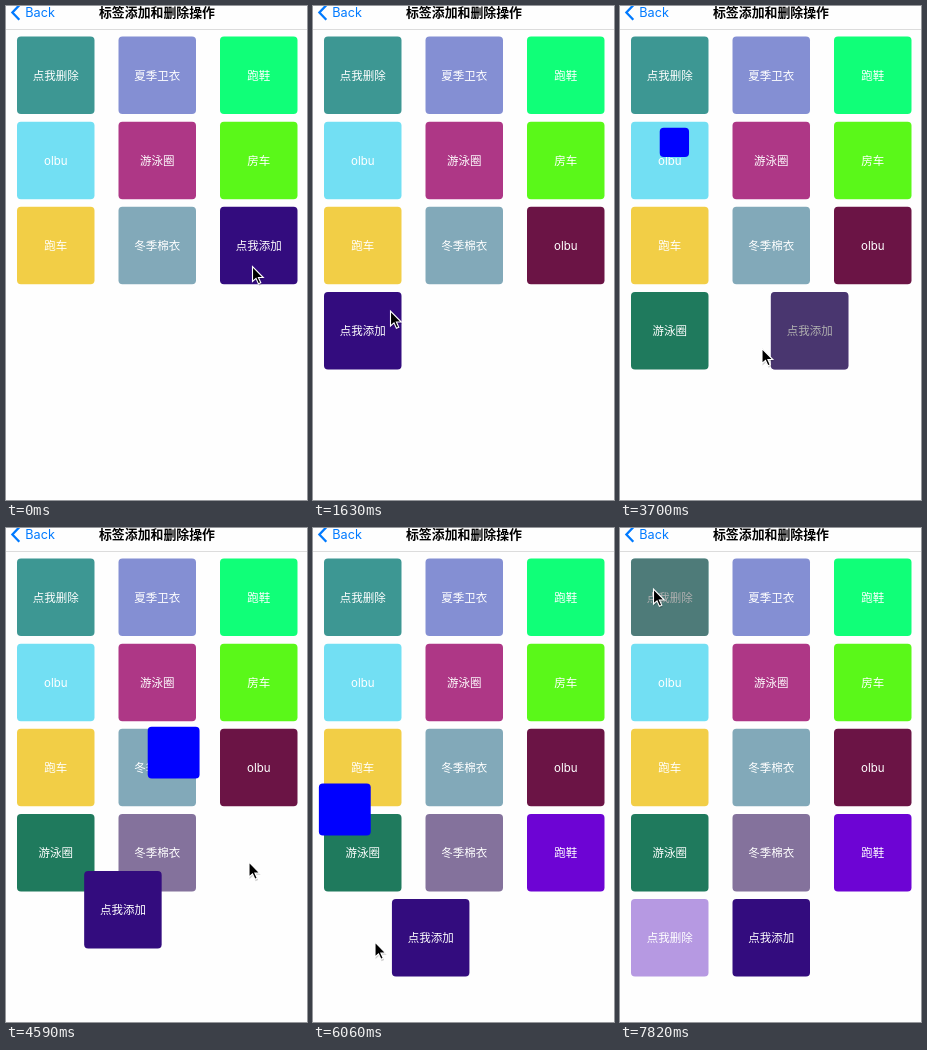
Write an HTML page that moves like this. It is 301 by 494 pixels and loops after 8 s.

```html
<!DOCTYPE html>
<html lang="zh-CN">
<head>
<meta charset="utf-8">
<title>标签添加和删除操作</title>
<style>
html, body { margin: 0; width: 100%; height: 100%; overflow: hidden; background: #fefefe; }
svg { display: block; width: 100vw; height: 100vh; }
text { font-family: Inter, "Noto Sans CJK SC", "Noto Sans CJK", sans-serif; }
.tag text { font-size: 11.5px; fill: #fff; text-anchor: middle; }
</style>
</head>
<body>
<svg id="stage" viewBox="0 0 301 494">
  <rect width="301" height="494" fill="#fefefe"/>
  <rect y="23" width="301" height="1" fill="#dcdcdc"/>
  <path d="M13.3-.8L6.4 6.5l6.9 7.3" fill="none" stroke="#007aff" stroke-width="2.3"/>
  <text x="19.3" y="11" font-size="12.7" fill="#007aff">Back</text>
  <text x="151" y="11.2" font-size="12.9" font-weight="600" text-anchor="middle">标签添加和删除操作</text>
  <g id="tags"></g>
  <rect id="flyer" rx="4" fill="#00f"/>
  <g id="cursor">
    <path d="M.5 1.5v15.5l3.6-3.2 2.5 5.4 2.6-1.2-2.5-5.2h5z" fill="#000" opacity=".18"/>
    <path d="M0 0v15l3.5-3.2 2.4 5.5 2.4-1-2.4-5.3h4.9z" fill="#000" stroke="#fff" stroke-width="1.1"/>
  </g>
</svg>
<script>
const LOOP = 8000, STEP = 147.7, MOVE = 250, SIZE = 77.5;
const FIRST = 8; // slot of the add button before any insertion
const $ = id => document.getElementById(id);

const fixed = [
  ['点我删除', '#3d9793'], ['夏季卫衣', '#848fd3'], ['跑鞋', '#10ff78'],
  ['olbu', '#72dff3'], ['游泳圈', '#ae3786'], ['房车', '#5af819'],
  ['跑车', '#f2ce46'], ['冬季棉衣', '#82a9b9']
];
const inserts = [
  { press: 140, start: 584, label: 'olbu', color: '#6b1445' },
  { press: 2060, start: 2314, label: '游泳圈', color: '#1f7a5d' },
  { press: 3390, start: 3588, label: '冬季棉衣', color: '#84729c' },
  { press: 4275, start: 4425, label: '跑鞋', color: '#6d04d4' },
  { press: 5755, start: 5902, label: '点我删除', color: '#b699e2' }
];
const deletePress = 7670;

// pointer stops: step, x, y
const route = [
  [0, 246.5, 260.5], [5, 246.5, 260.5], [11, 77.5, 305], [13, 64.5, 316],
  [17, 64.5, 316], [20, 142, 356], [22, 142, 356], [24, 142, 342.5],
  [25, 142, 342.5], [28, 243, 334], [31, 243, 334], [35, 175.5, 391.5],
  [37, 62, 414], [41, 62, 414], [45, 56.5, 45.5], [46, 34, 33],
  [47, 24, 20], [49, 30, 50], [50, 33.5, 61], [55, 33.5, 61]
];

const mix = (a, b, p) => a + (b - a) * p;
const ease = t => t * t * (3 - 2 * t);
const progress = (t, start) => ease(Math.min(1, Math.max(0, (t - start) / MOVE)));
const slot = i => [11 + i % 3 * 101.5, 30.5 + Math.floor(i / 3) * 85.15];

function node(name, attrs, parent) {
  const el = document.createElementNS('http://www.w3.org/2000/svg', name);
  for (const key in attrs) el.setAttribute(key, attrs[key]);
  return parent.appendChild(el);
}

function place(el, x, y) {
  el.setAttribute('transform', `translate(${x} ${y})`);
}

function makeTag(label, color, i) {
  const g = node('g', { class: 'tag' }, $('tags'));
  const box = { width: SIZE, height: SIZE, rx: 4 };
  node('rect', { ...box, fill: color }, g);
  node('text', { x: SIZE / 2, y: 43.3 }, g).textContent = label;
  const shade = node('rect', { ...box, fill: '#606060', opacity: 0 }, g);
  place(g, ...slot(i));
  return { g, shade };
}

const show = (el, on) => el.setAttribute('visibility', on ? 'visible' : 'hidden');
const dim = (tag, on) => tag.shade.setAttribute('opacity', on ? 0.5 : 0);

const base = fixed.map(([label, color], i) => makeTag(label, color, i));
const added = inserts.map((n, i) => makeTag(n.label, n.color, FIRST + i));
const adder = makeTag('点我添加', '#330c7e', FIRST);

function pointerAt(step) {
  const i = Math.max(1, route.findIndex(r => r[0] >= step));
  const [k0, x0, y0] = route[i - 1], [k1, x1, y1] = route[i];
  const p = (step - k0) / (k1 - k0);
  return [mix(x0, x1, p), mix(y0, y1, p)];
}

function render(ms) {
  const step = Math.floor((ms + 10) / STEP), t = step * STEP;
  let [x, y] = slot(FIRST), pressed = false, flying = false;

  inserts.forEach((n, i) => {
    const p = progress(t, n.start);
    const [tx, ty] = slot(FIRST + i), [nx, ny] = slot(FIRST + i + 1);
    show(added[i].g, p === 1);
    if (p > 0) {
      x = mix(tx, nx, p);
      y = mix(ty, ny, p);
    }
    if (p > 0 && p < 1) {
      flying = true;
      const size = SIZE * p;
      const attrs = { x: mix(-4.5, tx, p), y: mix(22, ty, p), width: size, height: size };
      for (const key in attrs) $('flyer').setAttribute(key, attrs[key]);
    }
    pressed = pressed || (t >= n.press && t < n.start + 150);
  });

  place(adder.g, x, y);
  dim(adder, pressed);
  dim(base[0], t >= deletePress);
  show($('flyer'), flying);
  place($('cursor'), ...pointerAt(step));
}

const origin = performance.now();
function tick() {
  render((performance.now() - origin) % LOOP);
  requestAnimationFrame(tick);
}
tick();
</script>
</body>
</html>
```
